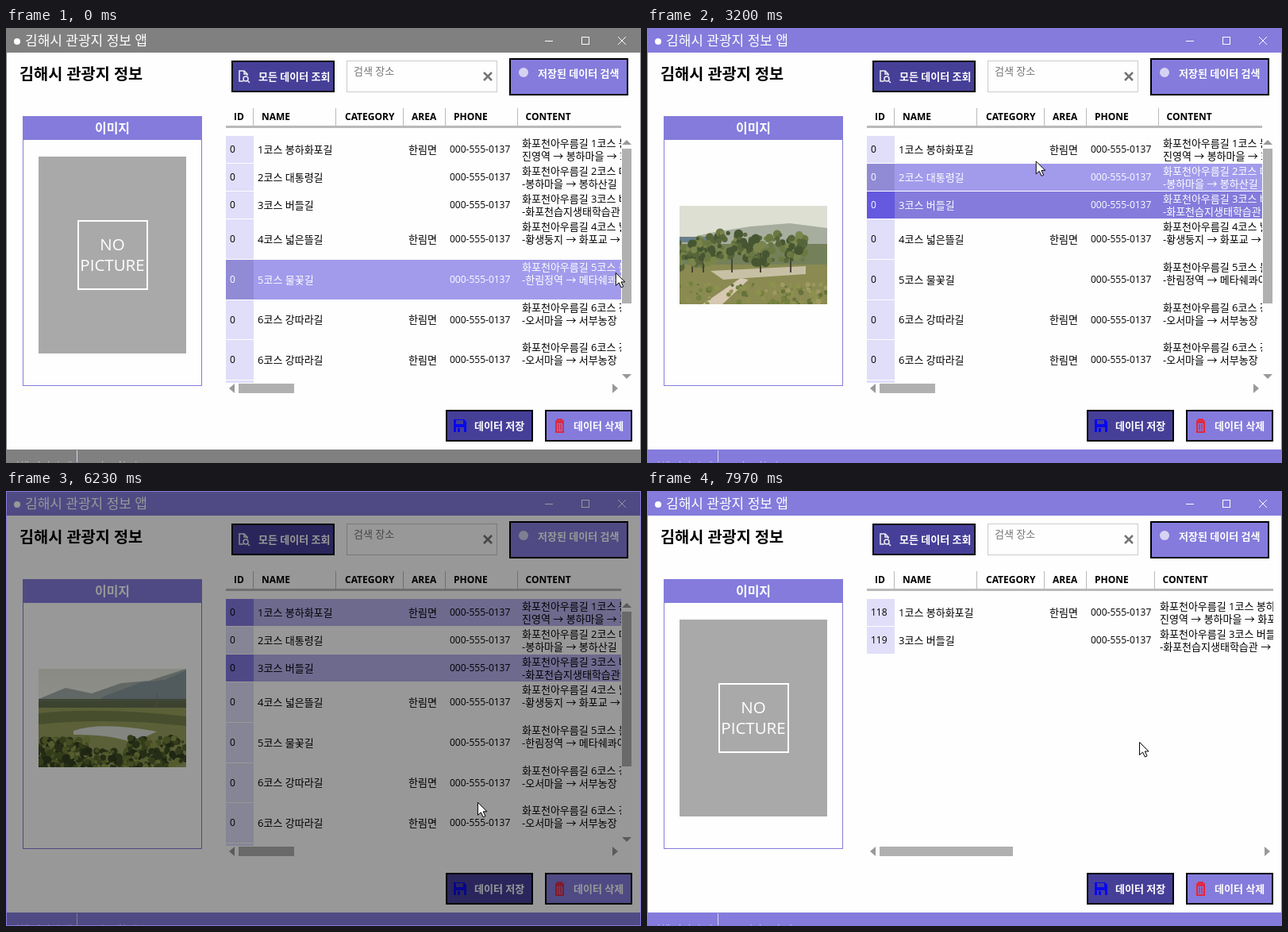
An HTML page for the animation above (8000 ms loop, 800 by 548 pixels).

```html
<!DOCTYPE html>
<html lang="ko">
<head>
<meta charset="utf-8">
<style>
html, body { margin: 0; width: 100%; height: 100%; overflow: hidden; background: #fefefe; }
svg { display: block; font-family: "Open Sans", "Noto Sans CJK KR", sans-serif; }
text { white-space: pre; }
</style>
</head>
<body>
<svg id="stage" width="800" height="548" viewBox="0 0 800 548"></svg>
<script>
const LOOP = 8000;
const PURPLE = '#847bdc', NAVY = '#463f98', GRAY = '#808080', WHITE = '#fefefe';

const rect = (x, y, w, h, fill, extra = '') =>
  `<rect x="${x}" y="${y}" width="${w}" height="${h}" fill="${fill}" ${extra}/>`;
const path = (d, fill, extra = '') => `<path d="${d}" fill="${fill}" ${extra}/>`;
const line = (d, color, width = 1) => path(d, 'none', `stroke="${color}" stroke-width="${width}"`);
const label = (x, middle, str, size = 13, fill = '#000', extra = '') =>
  `<text x="${x}" y="${middle + size * 0.36}" font-size="${size}" fill="${fill}" ${extra}>${str}</text>`;
const BOLD = 'font-weight="700"', CENTER = 'text-anchor="middle"';
const button = (x, y, w, h, fill) =>
  rect(x + 1, y + 1, w - 2, h - 2, fill, 'stroke="#000" stroke-width="2"');

function randomizer(seed) {
  return () => (seed = (seed * 16807) % 2147483647) / 2147483647;
}

function foliage(seed, count, x, y, w, h, radius, colors) {
  const rnd = randomizer(seed);
  let out = '';
  for (let i = 0; i < count; i++) {
    out += `<circle cx="${x + rnd() * w}" cy="${y + rnd() * h}" r="${radius * (0.5 + rnd())}"
      fill="${colors[Math.floor(rnd() * colors.length)]}"/>`;
  }
  return out;
}

const noPicture = rect(41, 162, 186, 248, '#a9a9a9') +
  rect(91, 243, 87, 86, 'none', 'stroke="#fff" stroke-width="2"') +
  label(134, 273, 'NO', 20.5, '#fff', CENTER) +
  label(134, 299, 'PICTURE', 20.5, '#fff', CENTER);

const parkPhoto = rect(41, 224, 186, 124, '#dcdfd2') +
  path('M41 268L80 258 130 250 180 246 227 252V310H41Z', '#a7ae9f') +
  rect(41, 263, 38, 7, '#68808c') +
  rect(41, 272, 186, 30, '#74805a') +
  rect(41, 298, 186, 50, '#8a8a52') +
  path('M80 306L200 300V310L96 317Z', '#c8c0a4') +
  path('M118 315L70 348H95L128 317Z', '#d6c8b2') +
  [[57, 286], [71, 281], [107, 273], [143, 281], [181, 277]].map(([x, y], i) =>
    line(`M${x} ${y}V308`, '#4b4538', 2) +
    foliage(31 + i * 17, 45, x - 17, y - 18, 34, 34, 4, ['#57653a', '#6a7942', '#465632', '#7a854c'])).join('') +
  foliage(7, 110, 41, 322, 186, 26, 2.5, ['#75823f', '#a09a62', '#8d914e', '#66723b']);

const bushes = ['#56642c', '#707d38', '#3f4c24', '#8d984c', '#333f1f'];
const marshPhoto = rect(41, 224, 186, 124, 'url(#sky)') +
  path('M41 262L75 248 108 255 145 242 180 239 227 224V272H41Z', '#a3ada8') +
  path('M120 260L170 241 200 238 227 226V272H120Z', '#88979c') +
  rect(41, 262, 186, 12, '#64704f') +
  rect(41, 273, 186, 75, '#98a05e') +
  path('M41 280Q120 272 227 284V296Q130 285 41 294Z', '#76834c') +
  path('M85 302Q120 290 190 303L160 317Q130 306 85 307Z', '#dcdfd6') +
  line('M41 264H227M190 255V272', '#7b7c74') +
  foliage(91, 170, 41, 313, 62, 35, 3.5, bushes) +
  foliage(57, 170, 155, 311, 72, 37, 3.5, bushes) +
  foliage(23, 120, 95, 326, 70, 22, 3, bushes);

const photos = { none: noPicture, park: parkPhoto, marsh: marshPhoto };

const PHONE = '000-555-0137';
const prefix = '화포천아우름길 ';
const row = (top, height, name, area, route) => ({ top, height, name, area, route });
const courses = [
  row(136, 34, '1코스 봉하화포길', '한림면', '진영역 → 봉하마을 → 화포천'),
  row(171, 34, '2코스 대통령길', '', '-봉하마을 → 봉하산길'),
  row(206, 34, '3코스 버들길', '', '-화포천습지생태학습관 → 화포천'),
  row(241, 50, '4코스 넓은뜰길', '한림면', '-황생둥지 → 화포교 → 한림'),
  row(292, 50, '5코스 물꽃길', '', '-한림정역 → 메타쉐콰이아길'),
  row(343, 49, '6코스 강따라길', '한림면', '-오서마을 → 서부농장'),
  row(393, 50, '6코스 강따라길', '한림면', '-오서마을 → 서부농장'),
  row(444, 50, '', '', '')
];
const savedCourses = [courses[0], { ...courses[2], top: 171 }];

// Row fill, ID cell fill and text colour for each state.
const rowLook = {
  plain: ['none', '#e0def9', '#000'],
  hover: ['#a29bec', '#918bd6', WHITE],
  selected: [PURPLE, '#6459df', WHITE],
  both: ['#a29bec', '#786edf', WHITE],
  inactive: ['#b6b1ee', '#837ae0', '#000']
};

function gridRow(r, look, id, right, contentX) {
  const [fill, idFill, ink] = rowLook[look];
  const mid = r.top + r.height / 2;
  const cells = rect(277, r.top, right - 277, r.height, fill) + rect(277, r.top, 35, r.height, idFill);
  if (!r.name) return cells;
  return cells + label(282, mid, id, 12, ink) + label(317, mid, r.name, 13, ink) +
    label(507, mid, r.area, 13, ink) + label(559, mid, PHONE, 12, ink) +
    label(contentX, r.top + 9, prefix + r.name, 13, ink) +
    label(contentX, r.top + 25, r.route, 13, ink);
}

function grid(looks, saved) {
  const right = saved ? 789 : 775, lastColumn = saved ? 639.5 : 644.5;
  const heads = [[287, 'ID'], [322, 'NAME'], [427, 'CATEGORY'], [511, 'AREA'], [564, 'PHONE'], [lastColumn + 10, 'CONTENT']];
  const rows = saved ? savedCourses : courses;
  const arrow = '#999', thumb = '#b0b0b0';
  let out = heads.map(([x, s]) => label(x, 112, s, 12, '#000', BOLD)).join('') +
    [311.5, 415.5, 500.5, 553.5, lastColumn].map(x => line(`M${x} 101V123`, '#b9b9b9')).join('') +
    rect(277, 123, right - 277, 3, '#b9b9b9') +
    `<g clip-path="url(#${saved ? 'wide' : 'narrow'})">` +
    rows.map((r, i) => gridRow(r, looks[i], saved ? 118 + i : 0, right, saved ? 646 : 650)).join('') + '</g>' +
    path('M288 448V460L281 454Z', arrow) + rect(293, 448, saved ? 168 : 70, 12, thumb) +
    path(`M${right - 11} 448V460L${right - 4} 454Z`, arrow);
  if (!saved) {
    out += path('M776 147H788L782 141Z', arrow) + rect(776, 152, 12, 195, thumb) + path('M776 436H788L782 442Z', arrow);
  }
  return out;
}

const trash = line('M692 495H703M695 495V493H700V495', '#f01c28', 1.6) +
  rect(693, 497, 9, 12, 'none', 'stroke="#f01c28" stroke-width="1.8"') + line('M696 499V507M699 499V507', '#f01c28', 1.3);
const floppy = path('M564 493H577L580 496V509H564Z', '#0808ee') +
  rect(567, 494, 9, 5, NAVY) + rect(567, 503, 10, 6, NAVY) + rect(569, 504, 3, 5, '#0808ee');
const searchPage = line('M299 67H294V54H300L304 58V60M300 54V58H304', '#eee', 1.5) +
  '<circle cx="302" cy="64" r="3" fill="none" stroke="#eee" stroke-width="1.5"/>' + line('M304 66L307 69', '#eee', 1.5);

const stage = document.getElementById('stage');
stage.innerHTML = `
<defs>
  <clipPath id="narrow">${rect(277, 127, 498, 320, '#000')}</clipPath>
  <clipPath id="wide">${rect(277, 127, 512, 320, '#000')}</clipPath>
  <clipPath id="photoClip">${rect(41, 162, 186, 248, '#000')}</clipPath>
  <clipPath id="landscapeClip">${rect(41, 224, 186, 124, '#000')}</clipPath>
  <linearGradient id="sky" x2="0" y2="1"><stop stop-color="#e6e8dc"/><stop offset=".4" stop-color="#f0f0ea"/></linearGradient>
</defs>
${rect(0, 0, 800, 548, WHITE)}
<g id="frame">${rect(0, 0, 800, 31, 'inherit')}${rect(0, 531, 800, 17, 'inherit')}</g>
<circle cx="14" cy="17" r="4" fill="#fff"/>
${label(24, 16, '김해시 관광지 정보 앱', 17, WHITE)}
${line('M679 16.5H689M771 11L781 21M781 11L771 21', WHITE)}${rect(725.5, 11.5, 9, 9, 'none', `stroke="${WHITE}"`)}
${label(17, 58, '김해시 관광지 정보', 19.7, '#000', BOLD)}
${button(284, 41, 130, 40, NAVY)}${searchPage}${label(318, 61, '모든 데이터 조회', 13, WHITE, BOLD)}
${rect(429.5, 41.5, 189, 39, WHITE, 'stroke="#ccc"')}${label(438, 54, '검색 장소', 13, '#757575')}
${line('M602 56L612 66M612 56L602 66', '#757575', 2.5)}
${button(634, 38, 150, 47, PURPLE)}<circle cx="652" cy="56" r="6" fill="#d6d3f2"/>
${label(670, 57, '저장된 데이터 검색', 13, WHITE, BOLD)}
${rect(21.5, 111.5, 225, 339, 'none', `stroke="${PURPLE}"`)}${rect(21, 111, 226, 30, PURPLE)}
${label(134, 126, '이미지', 16, WHITE, BOLD + ' ' + CENTER)}
<g id="photo"></g><g id="grid"></g>
${button(554, 481, 110, 40, NAVY)}${floppy}${label(590, 501, '데이터 저장', 13, WHITE, BOLD)}
${button(679, 481, 110, 40, PURPLE)}${trash}${label(715, 501, '데이터 삭제', 13, WHITE, BOLD)}
${label(5, 552, '김해 관광지 앱', 13, WHITE)}${line('M89.5 532V548', '#d8d5ee')}<g id="status"></g>
<rect id="shade" width="800" height="548"/>
<g id="dialog">${rect(1, 193, 798, 165, WHITE)}
${label(202, 221, '저장', 27)}${label(201, 263, '2건 DB저장 성공!', 16)}
${button(515, 298, 80, 35, '#4f4896')}${label(555, 315.5, 'OK', 12, '#fff', BOLD + ' ' + CENTER)}</g>
<g id="border">${rect(0.5, 0.5, 799, 547, 'none')}</g>
<g id="cursor">${path('M0 0V16L4 12.5 6.8 18.5 9.5 17.3 6.8 11.5H11.5Z', '#fff', 'stroke="#000"')}</g>`;

const part = id => document.getElementById(id);
const clamp = v => Math.max(0, Math.min(1, v));
const ramp = (t, from, to) => clamp((t - from) / (to - from));

const SELECT_PARK = 1250, SELECT_MARSH = 3400, ADD_PARK = 4850, SAVE = 5900, SAVED_VIEW = 7700;
const cursorKeys = [
  [0, 768, 308], [1150, 478, 220], [1350, 482, 226], [1930, 486, 288], [3300, 490, 158], [4430, 495, 163],
  [4800, 497, 216], [5000, 499, 224], [5500, 550, 444], [5750, 600, 496], [5920, 602, 498], [6230, 594, 392],
  [6600, 566, 322], [6830, 564, 317], [7200, 566, 316], [7970, 620, 316], [LOOP, 621, 316]
];

function cursorAt(t) {
  const i = cursorKeys.findIndex(k => k[0] > t);
  const [t0, x0, y0] = cursorKeys[i - 1], [t1, x1, y1] = cursorKeys[i];
  const p = ramp(t, t0, t1);
  return [x0 + (x1 - x0) * p, y0 + (y1 - y0) * p];
}

function rowStates(t, x, y) {
  const saved = t >= SAVED_VIEW, modal = t >= SAVE && !saved;
  const chosen = t < SELECT_PARK || saved ? [] : t < SELECT_MARSH ? [2] : t < ADD_PARK ? [0] : [0, 2];
  const hitY = y + 4;
  return (saved ? savedCourses : courses).map((r, i) => {
    const on = chosen.includes(i);
    if (modal) return on ? 'inactive' : 'plain';
    const over = x >= 277 && x < 775 && hitY >= r.top && hitY < Math.min(450, r.top + r.height + 1);
    return on ? (over ? 'both' : 'selected') : over ? 'hover' : 'plain';
  });
}

const shown = {};
function update(id, key, build) {
  if (shown[id] === key) return;
  shown[id] = key;
  part(id).innerHTML = build();
}

function draw(t) {
  const saved = t >= SAVED_VIEW;
  const [x, y] = cursorAt(t);
  const looks = rowStates(t, x, y);
  const photo = t < SELECT_PARK || saved ? 'none' : t < SELECT_MARSH ? 'park' : 'marsh';
  const accent = t < SELECT_PARK ? GRAY : PURPLE;

  part('frame').setAttribute('fill', accent);
  part('border').setAttribute('stroke', accent);
  update('grid', looks.join() + saved, () => grid(looks, saved));
  update('photo', photo, () =>
    `<g clip-path="url(#${photo === 'none' ? 'photoClip' : 'landscapeClip'})">${photos[photo]}</g>`);
  update('status', saved, () => label(saved ? 100 : 97, 552, saved ? 'DB 저장 2건 성공!' : '49건 조회 완료!', 13, WHITE));

  const dark = Math.min(ramp(t, 6030, 6380), 1 - ramp(t, 7400, 7700));
  part('shade').setAttribute('opacity', 0.7 * dark);
  part('dialog').setAttribute('opacity', Math.min(ramp(t, 6380, 6580), 1 - ramp(t, 7200, 7400)));
  part('cursor').setAttribute('transform', `translate(${x + 0.5} ${y + 0.5})`);
}

const start = performance.now();
function tick() {
  draw((performance.now() - start) % LOOP);
  requestAnimationFrame(tick);
}
tick();
</script>
</body>
</html>
```
